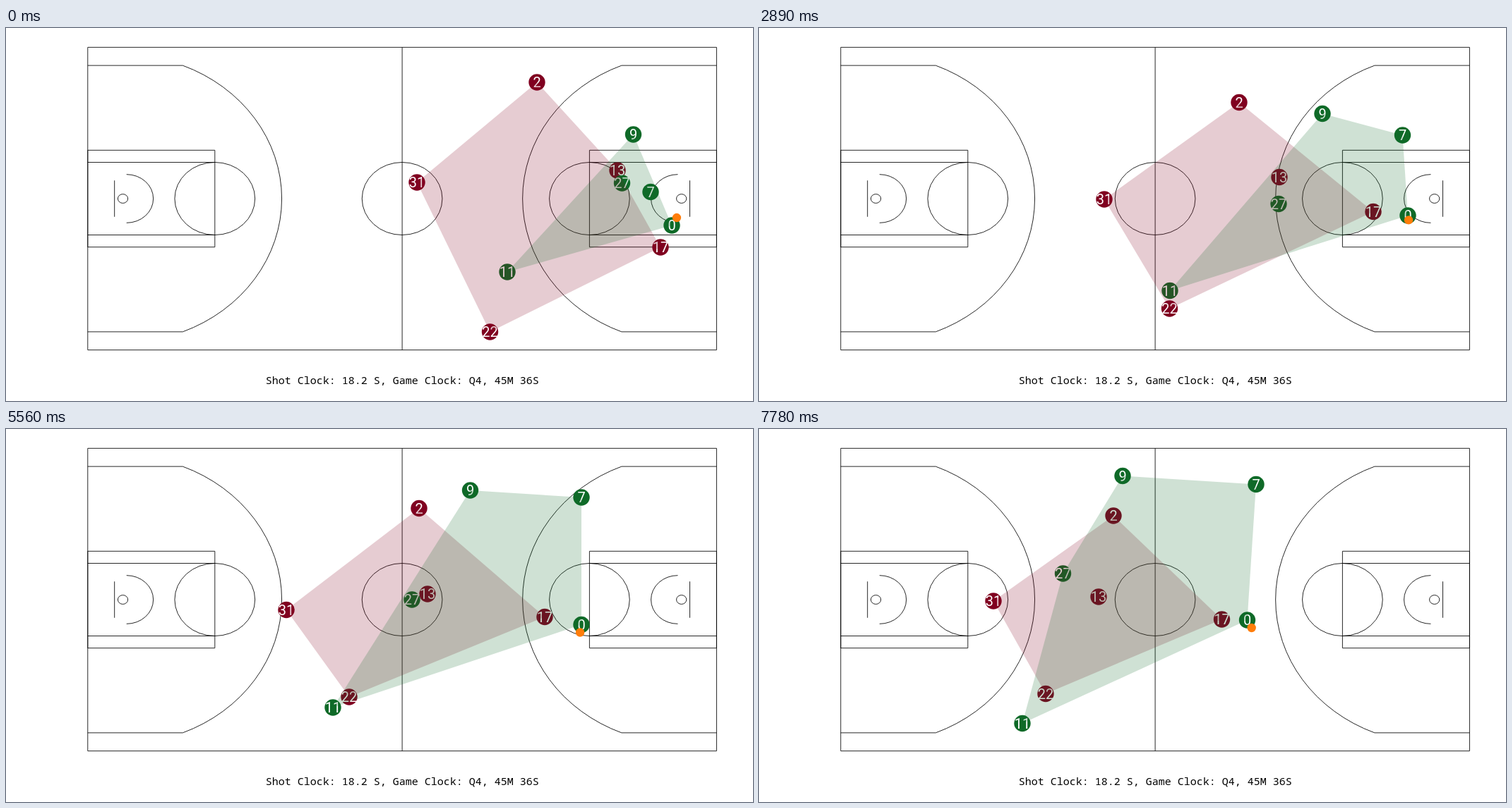
Recreate the animation shown at these times as an HTML page. Size 1058 by 529 pixels, loop 8 s.

```html
<!DOCTYPE html>
<html lang="en">
<head>
<meta charset="utf-8">
<title>Court tracking</title>
<style>
  html, body { margin: 0; width: 100%; height: 100%; overflow: hidden; background: #fff; }
  svg { display: block; width: 1058px; height: 529px; }
  #court { fill: none; stroke: #000; stroke-width: .85; }
  .num { font: 20px Roboto, sans-serif; fill: #fff; text-anchor: middle; }
  .clock { font: 15px "Noto Sans Mono", monospace; text-anchor: middle; }
</style>
</head>
<body>
<svg viewBox="0 0 1058 529">
  <g id="court"></g>
  <g id="dots"></g>
  <g id="labels"></g>
  <g id="hulls" fill-opacity=".2"></g>
  <circle id="ball" r="6.2" fill="#ff7d0a"/>
  <text class="clock" x="561.3" y="505">Shot Clock: 18.2 S, Game Clock: Q4, 45M 36S</text>
</svg>
<script>
const LOOP = 8000, STEPS = 36;

// Four points per player; a cubic path runs through them at these times.
const KEYS = [0, 13, 24.5, 34.5];
const teams = [
  { color: '#800020', players: {
    '31': [[582, 219], [489, 243], [397, 256.5], [332, 244]],
    '2': [[752, 77], [680, 105.5], [585, 112.5], [502, 123]],
    '13': [[866, 202], [737, 211.5], [597, 234], [481, 238]],
    '17': [[927, 311], [870, 260.5], [763, 266.5], [655.5, 270]],
    '22': [[685.5, 431], [581.5, 398], [486, 380], [406, 375.5]] } },
  { color: '#0f6a28', players: {
    '9': [[888.5, 151], [798, 121.5], [657.5, 87], [515, 66.5]],
    '27': [[872.5, 220], [736, 249.5], [575, 242], [430.5, 205]],
    '7': [[913, 232.5], [911.5, 152], [815, 97], [704, 78.5]],
    '0': [[943, 280], [919, 266], [815, 277.5], [691.5, 271]],
    '11': [[710, 346], [582, 372.5], [463, 395], [373, 417.5]] } }
];

const $ = id => document.getElementById(id);

function set(el, attrs) {
  for (const k in attrs) el.setAttribute(k, attrs[k]);
}

function add(parent, tag, attrs, text = '') {
  const el = document.createElementNS('http://www.w3.org/2000/svg', tag);
  set(el, attrs);
  el.textContent = text;
  return parent.appendChild(el);
}

// Court measured in feet from its centre; side is -1 (left) or 1 (right).
function drawCourt() {
  const X = 561.1, Y = 242, FX = 9.475, FY = 8.585;
  const path = d => add($('court'), 'path', { d });
  const pt = (x, y) => `${X + x * FX} ${Y + y * FY}`;
  const oval = (x, r) => add($('court'), 'ellipse', { cx: X + x * FX, cy: Y, rx: r * FX, ry: r * FY });
  const box = (x1, x2, h) => path(`M${pt(x1, -h)}L${pt(x2, -h)}L${pt(x2, h)}L${pt(x1, h)}Z`);
  const arc = (x, y, r, side) =>
    `M${pt(x, -y)}A${r * FX} ${r * FY} 0 0 ${side < 0 ? 1 : 0} ${pt(x, y)}`;

  box(-47, 47, 25);
  path(`M${pt(0, -25)}L${pt(0, 25)}`);
  oval(0, 6);
  for (const side of [-1, 1]) {
    const at = feet => side * (47 - feet);
    const bend = at(5.25 + Math.sqrt(23.75 ** 2 - 22 ** 2));
    path(arc(bend, 22, 23.75, side));
    for (const y of [-22, 22]) path(`M${pt(at(0), y)}L${pt(bend, y)}`);
    for (const y of [-6, 6]) path(`M${pt(at(0), y)}L${pt(at(19), y)}`);
    box(at(0), at(19), 8);
    oval(at(19), 6);
    oval(at(5.25), 0.75);
    path(`M${pt(at(4), -3)}L${pt(at(4), 3)}`);
    path(arc(at(5.8), 4, 4, side));
  }
}

function along(track, t) {
  const weight = i => KEYS.reduce((w, k, j) => j === i ? w : w * (t - k) / (KEYS[i] - k), 1);
  return [0, 1].map(axis => track.reduce((sum, p, i) => sum + p[axis] * weight(i), 0));
}

function hull(points) {
  const sorted = [...points].sort((a, b) => a[0] - b[0] || a[1] - b[1]);
  const chain = list => {
    const out = [];
    for (const p of list) {
      while (out.length > 1) {
        const [a, b] = out.slice(-2);
        if ((b[0] - a[0]) * (p[1] - a[1]) - (b[1] - a[1]) * (p[0] - a[0]) > 0) break;
        out.pop();
      }
      out.push(p);
    }
    return out.slice(0, -1);
  };
  return [...chain(sorted), ...chain(sorted.reverse())];
}

// The ball swings around its handler and passes from above to below.
function ballAt([x, y], t) {
  const swing = 11 * Math.exp(-t / 40) * Math.cos(2 * Math.PI * (t - 3) / 14.5);
  return { cx: x + 4 + swing, cy: y + 11 * Math.tanh((t - 11) / 3) };
}

drawCourt();
for (const team of teams) {
  team.hull = add($('hulls'), 'polygon', { fill: team.color });
  team.marks = Object.entries(team.players).map(([num, track]) => ({
    track,
    dot: add($('dots'), 'circle', { r: 11.7, fill: team.color }),
    label: add($('labels'), 'text', { class: 'num' }, num)
  }));
}

function draw(step) {
  // The play hesitates briefly after step 13.
  const t = step - 0.25 * Math.min(2, Math.max(0, step - 13));
  for (const team of teams) {
    const points = team.marks.map(({ track, dot, label }) => {
      const [x, y] = along(track, t);
      set(dot, { cx: x, cy: y });
      set(label, { x, y: y + 7.1 });
      return [x, y];
    });
    set(team.hull, { points: hull(points).join(' ') });
  }
  set($('ball'), ballAt(along(teams[1].players['0'], t), t));
}

let shown = -1;
function tick() {
  const ms = Math.floor(performance.now() % LOOP / 10) * 10;
  const step = Math.min(STEPS - 1, Math.floor((ms + 4.99) * STEPS / LOOP));
  if (step !== shown) draw(shown = step);
  requestAnimationFrame(tick);
}
tick();
</script>
</body>
</html>
```
